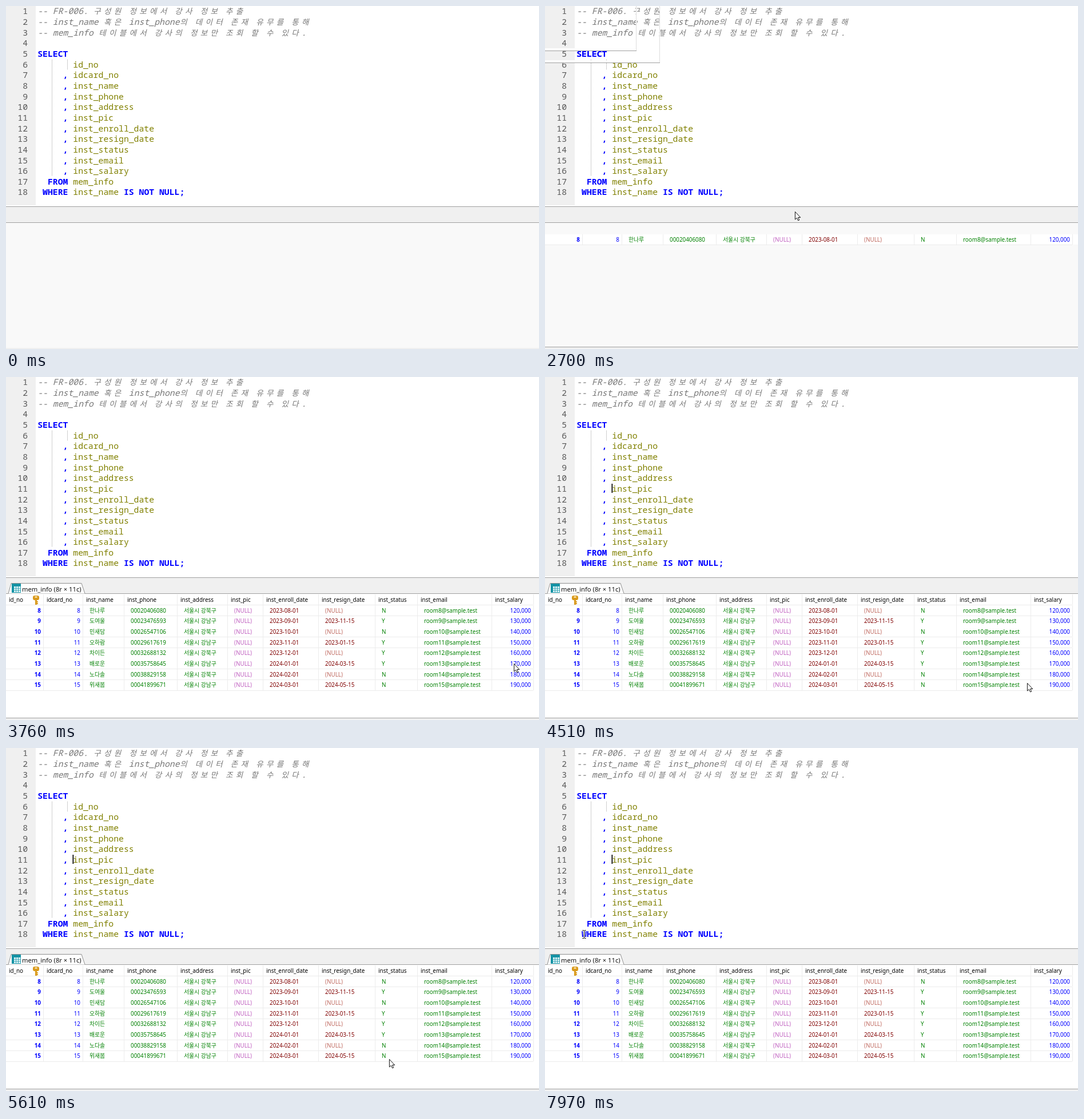
Recreate the animation shown at these times as an HTML page with a canvas. Size 932 by 601 pixels, loop 8000 ms.

```html
<!DOCTYPE html>
<html lang="ko">
<head>
<meta charset="utf-8">
<title>Query result</title>
<style>
html, body { margin: 0; width: 100%; height: 100%; overflow: hidden; background: #fff; }
canvas { display: block; width: 932px; height: 601px; }
</style>
</head>
<body>
<canvas id="stage"></canvas>
<script>
const W = 932, H = 601, LOOP = 8000;
const canvas = document.getElementById('stage');
const ctx = canvas.getContext('2d');
const dpr = window.devicePixelRatio || 1;
canvas.width = W * dpr;
canvas.height = H * dpr;

const MONO = '14.78px "Noto Sans Mono", monospace';
const HANGUL = 'italic 300 13.5px "Noto Sans CJK KR", sans-serif';
const UI = '"Noto Sans", "Noto Sans CJK KR", sans-serif';
const HEAD = '9.9px ' + UI, BODY = '9.85px ' + UI;
const CELL = 8.87, LEFT = 55.2, PITCH = 18.65;
const BLUE = '#0000ff', OLIVE = '#808000', GREEN = '#008000', MAROON = '#800000';
const EDGE = '#a0a0a0', FACE = '#f0f0f0', GRID = '#ececec';
const NULL = '(NULL)';

const comments = [
  '-- FR-006. 구성원 정보에서 강사 정보 추출',
  '-- inst_name 혹은 inst_phone의 데이터 존재 유무를 통해',
  '-- mem_info 테이블에서 강사의 정보만 조회 할 수 있다.'
];
const fields = ['id_no', 'idcard_no', 'inst_name', 'inst_phone', 'inst_address', 'inst_pic',
  'inst_enroll_date', 'inst_resign_date', 'inst_status', 'inst_email', 'inst_salary'];
const colors = [BLUE, BLUE, GREEN, GREEN, GREEN, '#c060c0', MAROON, MAROON, GREEN, GREEN, BLUE];
const people = ['한나루', '도여울', '민새담', '오하람', '차이든', '배로운', '노다솔', '위새봄'];

const day = (year, month, date) => `${year}-${String(month).padStart(2, '0')}-${date}`;

const records = people.map((name, i) => [
  `${i + 8}`, `${i + 8}`, name,
  '000' + (20406080 + i * 3070513),
  '서울시 ' + (i % 2 ? '강남구' : '강북구'),
  NULL,
  day(i < 5 ? 2023 : 2024, (i + 7) % 12 + 1, '01'),
  i % 2 ? day(i < 5 ? 2023 : 2024, (i + 9) % 12 + 1, 15) : NULL,
  'NYNYYYNN'[i],
  `room${i + 8}@sample.test`,
  `${120 + i * 10},000`
]);

// Columns fit the wider of heading and longest cell
function textWidth(text, font) {
  ctx.font = font;
  return ctx.measureText(text).width;
}
let edge = 0;
const columns = fields.map((name, i) => {
  const head = textWidth(name, HEAD) + (i ? 24 : 40);
  const body = Math.max(...records.map(r => textWidth(r[i], BODY))) + 31.4;
  const start = edge;
  edge += Math.round(Math.max(head, body));
  return { name, start, end: edge, color: colors[i], right: i < 2 || i === 10 };
});

// Arrival time and place of the pointer; it rests before each move
const MOVE = 500;
const stops = [
  [200, 0, 470], [480, 721, 440], [700, 270, 133], [870, 118, 189], [1550, 418, 362],
  [2100, 437, 360], [3350, 430, 409], [3600, 430, 409], [3760, 888, 502], [4370, 843, 536],
  [5000, 724, 518], [5600, 670, 545], [6030, 625, 557], [6400, 625, 557],
  [6640, 473, 299], [7210, 251, 335], [7970, 68, 326]
];

function rect(x, y, w, h, color) {
  ctx.fillStyle = color;
  ctx.fillRect(x, y, w, h);
}

function write(text, x, y, font, color, align = 'left') {
  ctx.font = font;
  ctx.fillStyle = color;
  ctx.textAlign = align;
  ctx.fillText(text, x, y);
}

function shape(points, fill, stroke, close = true) {
  ctx.beginPath();
  points.forEach(([x, y]) => ctx.lineTo(x, y));
  if (close) ctx.closePath();
  ctx.fillStyle = fill;
  ctx.fill();
  ctx.lineWidth = 1;
  ctx.strokeStyle = stroke;
  ctx.stroke();
}

const baseline = line => 14.4 + (line - 1) * PITCH;

function code(text, line, col, color = OLIVE, weight = '500 ') {
  write(text, LEFT + col * CELL, baseline(line), weight + MONO, color);
}

const keyword = (text, line, col) => code(text, line, col, BLUE, 'bold ');

// Hangul takes two cells of the code grid
function comment(text, line) {
  let col = 0;
  for (const ch of text) {
    const wide = ch >= '가';
    const font = wide ? HANGUL : 'italic ' + MONO;
    write(ch, LEFT + col * CELL + (wide ? 0.6 : 0), baseline(line), font, '#787878');
    col += wide ? 2 : 1;
  }
}

function dots(x, top, bottom) {
  for (let y = top; y < bottom; y += 2) rect(x, y, 1, 1, '#a0a0a0');
}

function editor() {
  rect(0, 0, W, 351, '#fff');
  rect(0, 0, 52, 349, FACE);
  for (let n = 1; n <= 18; n++) write(n, 38, baseline(n), MONO, '#585858', 'right');
  comments.forEach((text, i) => comment(text, i + 1));
  keyword('SELECT', 5, 0);
  dots(80, 94, 298);
  dots(107, 94, 112);
  fields.forEach((name, i) => {
    if (i) keyword(',', 6 + i, 5);
    code(name, 6 + i, 7);
  });
  keyword('FROM', 17, 2);
  code('mem_info', 17, 7);
  keyword('WHERE', 18, 1);
  code('inst_name', 18, 7);
  keyword('IS NOT NULL;', 18, 17);
}

function panel(loaded) {
  rect(0, 351, W, 250, FACE);
  rect(0, 351, W, 1, EDGE);
  rect(0, 379, W, 1, EDGE);
  rect(0, 380, W, loaded ? 217 : 219, '#f9f9f9');
  if (loaded) rect(0, 597, W, 1, EDGE);
}

function row(i) {
  const top = Math.round(400 + i * PITCH), y = 412.7 + i * PITCH;
  rect(0, top, W, 18, '#fff');
  rect(0, top + 18, edge, 1, GRID);
  columns.forEach(({ start, end, color, right }, c) => {
    const text = records[i][c];
    const faded = c === 7 && text === NULL;
    rect(end, top, 1, 18, GRID);
    write(text, right ? end - 4 : start + 12, y, (c ? '' : 'bold ') + BODY,
      faded ? '#c06a60' : color, right ? 'right' : 'left');
  });
}

function tab() {
  shape([[4, 379.5], [9, 361.5], [132, 361.5], [138, 379.5]], '#fff', '#909090', false);
  rect(10, 362, 16, 16, '#1593a5');
  for (let r = 0; r < 3; r++) {
    for (let c = 0; c < 3; c++) rect(14 + c * 4, 367 + r * 3.6, 3.2, 2.8, '#e4f7fa');
  }
  write('mem_info (8r × 11c)', 28, 375.7, '11.2px ' + UI, '#111');
}

function key() {
  const gold = '#d99a1c';
  ctx.fillStyle = gold;
  ctx.beginPath();
  ctx.roundRect(47, 383, 11, 8, 3);
  ctx.fill();
  rect(51, 390, 3, 9, gold);
  rect(54, 393, 2, 2, gold);
  rect(54, 396, 2, 2, gold);
  rect(50.5, 384.5, 4, 2, '#fff3d0');
}

function table() {
  rect(0, 380, W, 217, '#fff');
  rect(0, 399, edge, 1, GRID);
  columns.forEach(({ name, start, end }) => {
    rect(end, 381, 1, 18, GRID);
    write(name, start + (start ? 6 : 5), 393.9, HEAD, '#000');
  });
  key();
  records.forEach((_, i) => row(i));
  tab();
}

// Outline of a window left behind while the result opens
function ghost(w, h) {
  rect(w, 0, 2, h, '#fff');
  rect(0, h - 4, w, 4, '#fff');
  rect(w, 0, 1, h, '#dcdcdc');
  rect(0, h, w + 1, 1, EDGE);
}

// The blink restarts once the query has run
function caretOn(t) {
  const start = t < 3200 ? 810 : 3200;
  const idle = t < start || (t >= 2430 && t < 3200);
  return !idle && Math.floor((t - start) / 540) % 2 === 0;
}

function pointerAt(t) {
  const i = stops.findIndex(s => s[0] > t);
  if (i < 0) return stops[stops.length - 1].slice(1);
  const [t0, x0, y0] = stops[i - 1], [t1, x1, y1] = stops[i];
  const span = Math.min(MOVE, t1 - t0);
  const u = Math.max(0, 1 - (t1 - t) / span), e = u * u * (3 - 2 * u);
  return [x0 + (x1 - x0) * e, y0 + (y1 - y0) * e];
}

function beam(x, y) {
  for (const [pad, color] of [[1, '#fff'], [0, '#000']]) {
    rect(x - pad, y - 6, 1 + pad * 2, 13, color);
    for (const side of [-2.5, 1]) {
      rect(x + side - pad, y - 7, 2.5 + pad * 2, 1, color);
      rect(x + side - pad, y + 7, 2.5 + pad * 2, 1, color);
    }
  }
}

function arrow(x, y) {
  const points = [[0, 0], [0, 13.5], [3, 10.8], [5.2, 15.4], [7.3, 14.5], [5.2, 10], [9.3, 10]];
  shape(points.map(([dx, dy]) => [x + dx + 0.4, y + dy + 0.5]), '#fff', '#111');
}

function pointer(t) {
  if (t < stops[0][0]) return;
  const [x, y] = pointerAt(t).map(Math.round);
  if (y < 349 && x > 52) beam(x, y);
  else arrow(x, y);
}

function draw(t) {
  ctx.setTransform(dpr, 0, 0, dpr, 0, 0);
  editor();
  panel(t >= 2630);
  if (t >= 2760) table();
  else if (t >= 2700) {
    row(0);
    ghost(159, 78);
    ghost(200, 99);
    keyword('SELECT', 5, 0);
  }
  if (caretOn(t)) rect(116.5, 187, 1.7, 16, '#000');
  pointer(t);
}

const begin = performance.now();
function tick() {
  draw((performance.now() - begin) % LOOP);
  requestAnimationFrame(tick);
}
tick();
</script>
</body>
</html>
```
